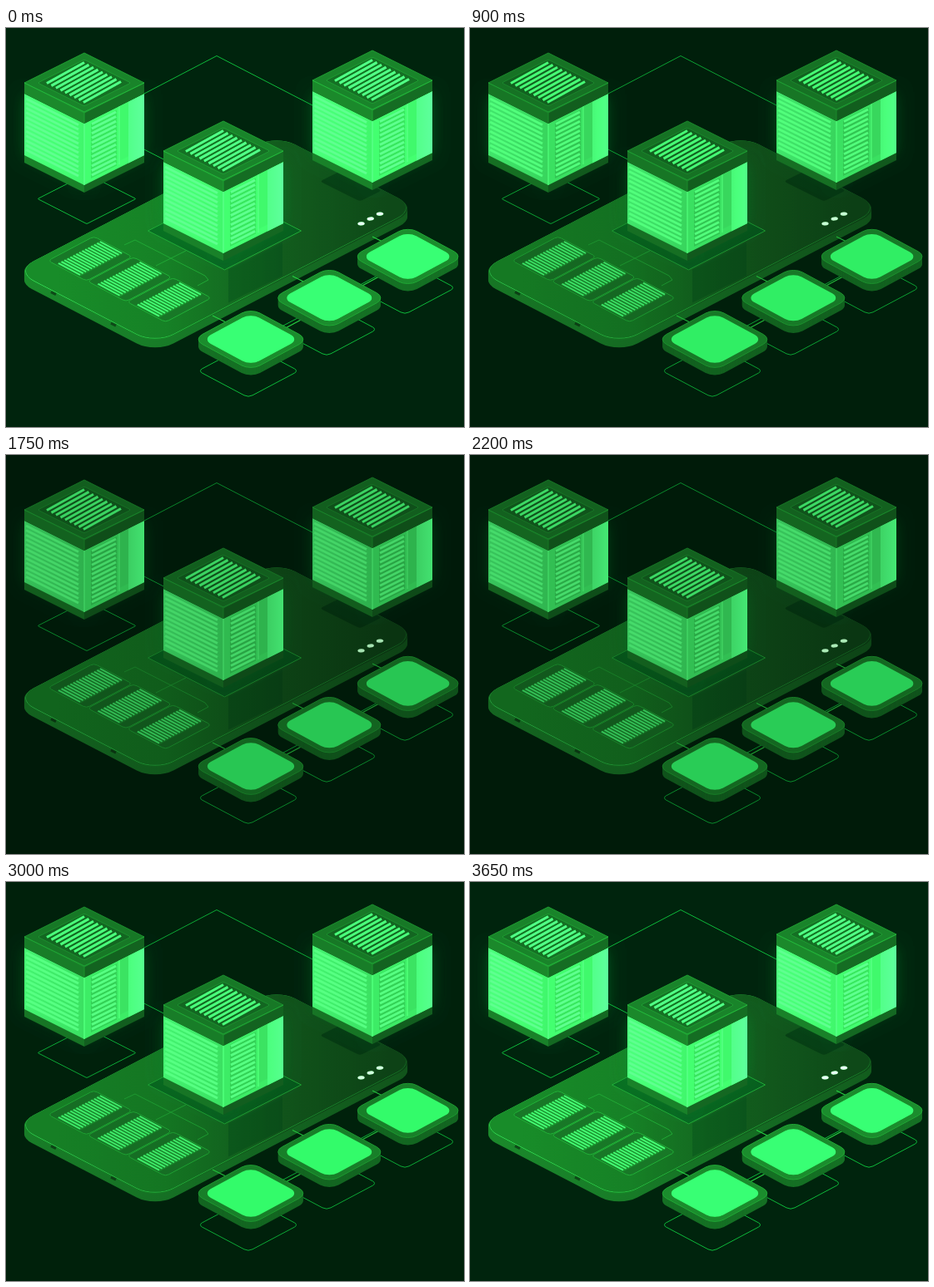
An HTML page with a canvas for the animation above (3700 ms loop, 550x480 px).

```html
<!DOCTYPE html>
<html lang="en">
<head>
<meta charset="utf-8">
<title>Isometric servers</title>
<style>
  html, body { margin: 0; width: 100%; height: 100%; overflow: hidden; background: #001a09; }
  canvas { display: block; }
</style>
</head>
<body>
<canvas id="stage" width="550" height="480"></canvas>
<script>
const LOOP = 3700, STEP = 50;
const CUBE = 72, CAP = 71, BODY = 85, BASE = 159, FLOOR = 168;

const canvas = document.getElementById('stage');
const ctx = canvas.getContext('2d');
const green = (g, tint = 0.32) => `rgb(${Math.round(g * tint * 0.6)},${g},${Math.round(g * tint)})`;
const LINE = 'rgb(10,132,42)';
const LIT = 'rgb(68,212,103)';

function gradient(x0, x1, ...colors) {
  const g = ctx.createLinearGradient(x0, 0, x1, 0);
  colors.forEach((c, i) => g.addColorStop(i / (colors.length - 1), c));
  return g;
}

function paint({ fill, stroke, width = 1 }) {
  if (fill) {
    ctx.fillStyle = fill;
    ctx.fill();
  }
  if (stroke) {
    ctx.strokeStyle = stroke;
    ctx.lineWidth = width;
    ctx.stroke();
  }
}

function line(points, stroke = LINE, width = 1) {
  ctx.beginPath();
  points.forEach(([x, y]) => ctx.lineTo(x, y));
  paint({ stroke, width });
}

// Flat rectangle on the ground: a runs down-right, b runs up-right, both half lengths.
function plate(x, y, a, b, style, radius = 0, slope = 0.5) {
  ctx.save();
  ctx.transform(1, slope, 1, -slope, x, y);
  ctx.beginPath();
  ctx.roundRect(-a, -b, 2 * a, 2 * b, radius);
  ctx.restore();
  paint(style);
}

function slab(x, y, a, b, height, side, style, radius, slope) {
  for (let d = height; d > 0; d--) plate(x, y + d, a, b, { fill: side }, radius, slope);
  plate(x, y, a, b, style, radius, slope);
}

// Part of a cube wall; heights are measured at the front vertical edge.
function wall(side, x0, x1, y0, y1, fill) {
  ctx.beginPath();
  ctx.moveTo(side * x0, y0 - x0 / 2);
  ctx.lineTo(side * x1, y0 - x1 / 2);
  ctx.lineTo(side * x1, y1 - x1 / 2);
  ctx.lineTo(side * x0, y1 - x0 / 2);
  paint({ fill });
}

function slats(side, x0, x1) {
  for (let y = BODY + 5; y < BASE - 4; y += 5.6)
    line([[side * x0, y - x0 / 2], [side * x1, y - x1 / 2]], LIT, 2.8);
}

// Parallel strokes along (ux, uy), spread over (vx, vy).
function grill(x, y, [ux, uy], [vx, vy], count, color, width) {
  for (let i = 0; i < count; i++) {
    const k = i / (count - 1), sx = x + vx * k, sy = y + vy * k;
    line([[sx, sy], [sx + ux, sy + uy]], color, width);
  }
}

function cube(x, y) {
  ctx.save();
  ctx.translate(x, y);

  ctx.save();
  ctx.shadowColor = 'rgba(0,110,35,0.4)';
  ctx.shadowBlur = 18;
  wall(-1, 0, CUBE, BODY, BASE, green(80));
  wall(1, 0, CUBE, BODY, BASE, green(80));
  ctx.restore();

  wall(-1, 0, CUBE, BODY, FLOOR, green(92));
  wall(1, 0, CUBE, BODY, FLOOR, green(74));

  wall(-1, 0, CUBE, BODY, BASE, gradient(-CUBE, 0, green(190, 0.47), green(176, 0.44)));
  slats(-1, 7, 70);

  wall(1, 0, CUBE, BODY, BASE, green(185, 0.43));
  wall(1, 8, 39, BODY + 3, BASE - 4, green(163, 0.42));
  slats(1, 9, 38);
  wall(1, 42, 53, BODY, BASE - 8, green(178, 0.43));
  wall(1, 53, CUBE, BODY, BASE, gradient(53, CUBE, green(205, 0.48), green(224, 0.5)));
  line([[42, 64], [42, 134]], LIT);
  line([[0, BODY], [0, BASE]], LIT, 1.2);

  wall(-1, 0, CUBE, CAP, BODY, green(98));
  wall(1, 0, CUBE, CAP, BODY, green(78));
  plate(0, 36, 36, 36, { fill: green(94), stroke: green(114) });
  plate(0, 36, 28, 28, { fill: green(80), stroke: green(112) }, 2);
  line([[-CUBE, 36], [0, CAP], [CUBE, 36]], green(130));
  line([[0, CAP], [0, BODY]], green(114));
  grill(-45, 36.5, [45, -25], [44, 23], 9, green(210, 0.46), 3.1);

  ctx.restore();
}

function chip(x, y) {
  plate(x, y, 23, 27.5, { fill: green(86), stroke: green(126) }, 4, 0.53);
  plate(x, y, 14, 26, { fill: green(105) }, 1, 0.53);
  grill(x - 38, y + 5.5, [26, 14], [50, -26], 15, green(186, 0.45), 1.8);
}

function phone() {
  const x = 252, y = 255.5;
  const side = gradient(20, 485, green(98), green(84), green(66));
  const top = gradient(60, 460, green(100, 0.29), green(92, 0.29), green(66), green(52));
  const rim = gradient(20, 485, green(165, 0.4), green(130), green(90));
  slab(x, y, 85, 158, 9, side, { fill: top }, 22, 0.52);
  plate(x, y - 1, 84, 157, { stroke: rim }, 22, 0.52);
  plate(x, y - 1.5, 84, 157, { fill: top }, 22, 0.52);

  plate(414, 190, 24, 13, { fill: 'rgba(0,38,13,0.6)' }, 3);
  wall(1, 267, 332, 424, 464, 'rgba(0,52,18,0.35)');
  for (const bx of [57, 129]) line([[bx - 3, bx * 0.52 + 288], [bx + 3, bx * 0.52 + 291]], green(52), 3);

  line([[142, 261], [155, 255], [239, 298], [243, 303], [230, 310]], green(120));
  line([[180, 286], [216, 268]], green(120));
  for (let i = 0; i < 3; i++) chip(101 + 47.5 * i, 277.5 + 24.8 * i);

  plate(262.5, 244, 46, 46, { fill: 'rgba(0,70,23,0.6)', stroke: green(122) }, 0, 0.51);

  for (let i = 0; i < 3; i++) {
    ctx.beginPath();
    ctx.ellipse(426.5 + 11.2 * i, 235.3 - 5.8 * i, 4.2, 2.1, -0.1, 0, Math.PI * 2);
    paint({ fill: 'rgb(165,226,176)' });
  }
}

function pads() {
  const each = draw => [2, 1, 0].forEach(draw);

  each(i => plate(291 + 94 * i, 412.5 - 50 * i, 30.2, 30.2, { stroke: LINE }, 5, 0.53));
  each(i => {
    const x = 248 + 96 * i, y = 346 - 47.5 * i;
    line([[x, y], [x + 20, y + 10]], green(150), 1.2);
  });
  for (let i = 0; i < 2; i++) {
    const x = 332 + 92 * i, y = 363 - 51 * i;
    line([[x, y], [x + 26, y - 14]], green(150), 1.2);
  }
  each(i => {
    const x = 294 + 94.3 * i, y = 374.5 - 49.8 * i, half = 34.6 - 0.6 * i;
    slab(x, y, half, half, 9, green(80), { fill: green(100), stroke: green(120) }, 11, 0.54);
    plate(x, y, half - 5.6, half - 5.6, { fill: 'rgb(40,197,83)' }, 10, 0.54);
  });
}

function drawScene() {
  ctx.fillStyle = 'rgb(0,26,9)';
  ctx.fillRect(0, 0, canvas.width, canvas.height);

  line([[166, 79], [253, 33.5], [368, 93]]);
  line([[160, 143], [195, 161]]);
  plate(97, 205.5, 29.5, 29.5, { stroke: LINE }, 1, 0.51);

  phone();
  cube(94, 30);
  cube(440, 27);
  cube(261, 112);
  pads();
}

function animate(now) {
  const t = Math.floor((now % LOOP) / STEP) * STEP;
  const brightness = 1.2 + 0.2 * Math.cos(2 * Math.PI * t / LOOP);
  canvas.style.filter = `brightness(${brightness.toFixed(4)})`;
  requestAnimationFrame(animate);
}

drawScene();
const start = performance.now();
requestAnimationFrame(now => animate(Math.max(0, now - start)));
</script>
</body>
</html>
```
